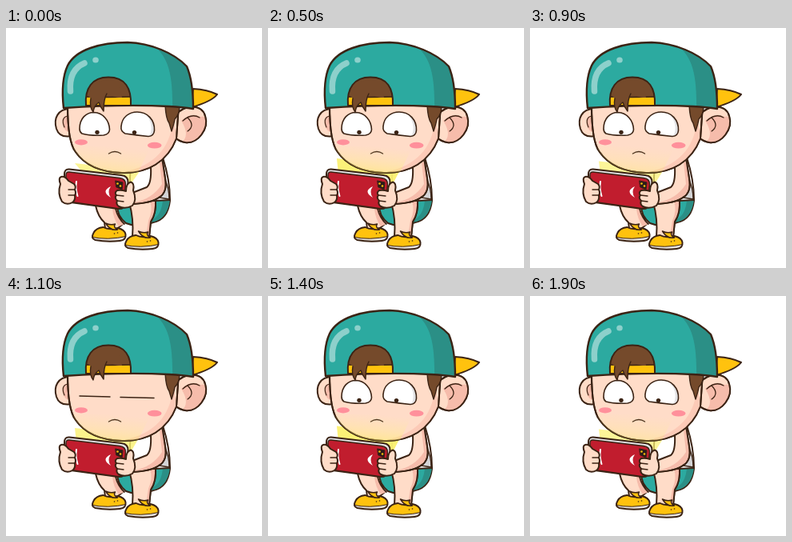
Animation of 320x300 px, one loop 2000 ms. Source, as an HTML page with a canvas:

```html
<!DOCTYPE html>
<html lang="en">
<head>
<meta charset="utf-8">
<title>Boy with a phone</title>
<style>
  html, body { margin: 0; width: 100%; height: 100%; overflow: hidden; background: #fff; }
  canvas { display: block; }
</style>
</head>
<body>
<canvas id="stage" width="320" height="300"></canvas>
<script>
const ctx = document.getElementById('stage').getContext('2d');
const LOOP = 2000, STEP = 100;
const INK = '#3b2314', SKIN = '#ffdcc8', SHADE = '#f6bcab', PINK = '#ff909b';
const TEAL = '#2caaa0', DEEP = '#2b8f86', GOLD = '#ffc20e';
const HAIR = '#754a2b', RED = '#c11d2e';

ctx.lineCap = ctx.lineJoin = 'round';

function shape(d, fill, width = 2, stroke = INK) {
  const path = new Path2D(d);
  if (fill) { ctx.fillStyle = fill; ctx.fill(path); }
  if (width) { ctx.strokeStyle = stroke; ctx.lineWidth = width; ctx.stroke(path); }
}

function oval(x, y, rx, ry, fill) {
  ctx.beginPath();
  ctx.ellipse(x, y, rx, ry, 0, 0, Math.PI * 2);
  ctx.fillStyle = fill;
  ctx.fill();
}

function clipped(d, draw) {
  ctx.save();
  ctx.clip(new Path2D(d));
  draw();
  ctx.restore();
}

function shoe(x, y) {
  const outline = 'M1 8 Q-3 15 3 17 Q18 20 34 18 Q42 17 41 10 Q40 4 31 2 Q20 5 13 1 Q4 2 1 8 Z';
  ctx.save();
  ctx.translate(x, y);
  shape(outline, GOLD, 0);
  clipped(outline, () => shape('M-3 13 Q18 18 44 12 L44 22 L-3 22 Z', '#e6e1dc', 1));
  shape(outline, null);
  shape('M16 -4 Q22 -1 28 -3 Q25 1 31 4 Q22 6 16 -4 Z', GOLD, 1.5);
  oval(27, 9, 0.8, 0.8, INK);
  oval(31, 8, 0.8, 0.8, INK);
  ctx.restore();
}

function legs() {
  shape('M136 220 Q140 236 150 244 Q164 250 184 243 Q202 240 205 216 L192 202 Z', TEAL);
  shape('M205 214 Q203 236 186 242 Q181 243 177 243 Q196 236 196 212 Z', DEEP, 0);
  shape('M112 222 Q115 236 123 243 L124 251 Q131 255 139 251 L146 245 Q141 236 138 220 Z', SKIN);
  shape('M137 226 Q140 238 148 245 L141 248 Q134 238 133 226 Z', SHADE, 0);
  shape('M137 226 Q140 238 148 245', null, 1.8);
  shape('M154 218 Q160 239 158 261 Q168 265 179 261 L181 242 Q188 232 187 214 L162 214 Z', SKIN);
  shape('M180 217 Q184 227 178 241 L175 260 L179 260 L181 242 Q188 232 187 214 Z', SHADE, 0);
  shape('M179 261 L181 242 Q188 232 187 214', null);
  shoe(108.5, 248);
  shoe(149.5, 258);
}

function torso() {
  shape('M157 170 Q152 198 158 217 L186 216 L205 215 Q205 190 196 162 Z', '#fff');
  shape('M189 207 Q198 202 198 188 Q204 200 204 214 L192 212 Z', '#d4d4d6', 1.4);
}

function arm() {
  shape('M181 174 Q182 194 176 199 L158 206 L158 220 Q181 219 191 212 Q202 206 199 188 L195 162 Z', SKIN);
  shape('M160 218 Q183 214 195 195 L192 168 L196 168 L198 188 Q201 206 190 211 Q181 217 160 219 Z', SHADE, 0);
  shape('M158 220 Q181 219 191 212 Q202 206 199 188 L195 162', null);
}

function head() {
  const ear = 'M213 108 C222 96 245 94 249 110 C254 126 240 145 224 143 Q217 142 211 137 Z';
  shape('M234 76 Q252 77 264 83 Q257 92 232 99 Z', GOLD);

  shape('M80 101 C65 101 59 113 63 126 Q67 138 82 135 Z', SKIN);
  shape('M78 110 C68 107 68 128 79 130 Z', SHADE, 0);
  shape('M77 110 Q68 112 73 124', null, 1.2);

  shape(ear, SKIN);
  clipped(ear, () => shape('M219 116 Q232 104 243 111 L252 110 L250 146 L214 146 Q233 138 219 116 Z', SHADE, 0));
  shape(ear, null);
  shape('M221 116 Q232 106 242 112 M227 112 Q237 122 227 129', null, 1.3);

  const face = 'M77 96 C77 122 79 145 87 155 C98 171 118 180 145 181 C177 182 202 167 213 138 L216 96 Z';
  shape(face, SKIN);
  clipped(face, () => shape('M209 112 C207 145 190 169 155 178 L152 185 L220 180 Z', '#fccab7', 0));
  shape(face, null);
  shape('M199 97 Q200 114 204 119 L207 129 Q210 120 211 114 Q217 108 217 97 Z', HAIR, 1.4);
  oval(94, 142.8, 8, 3.6, PINK);
  oval(185.7, 146.7, 8.8, 3.9, PINK);
  shape('M128.5 157 Q136 152 143.5 157', null, 1.4);
}

function cap() {
  const dome = 'M72 100 C70 82 70 62 77 47 C87 27 118 18 152 18 C181 19 210 31 226 48 C232 62 234 82 234 101 Q221 99 204 98 Q147 95 72 100 Z';
  shape(dome, TEAL, 0);
  clipped(dome, () => shape('M180 18 C202 34 209 54 208 104 L240 104 L238 12 Z', DEEP, 0));
  shape(dome, null, 2.4);
  shape('M80.5 79 C79 60 86 49 98 44', null, 7.5, '#8dd0cb');
  oval(112, 40, 3.8, 3.6, '#8dd0cb');

  const gap = 'M100 97 C98 75 108 61.5 128 61.5 C149 61.5 157 75 156 97 Z';
  shape(gap, HAIR, 0);
  clipped(gap, () => shape('M98 86 Q127 87 159 86 L159 98 L98 98 Z', GOLD, 1.6));
  shape(gap, null);
  shape('M103 85 Q107 66 126 65 Q143 67 145 87 Q135 87 126 82 Q122 89 122 104 Q118 99 116 93 Q110 97 109 105 Q104 99 106 88 Z', HAIR, 0);
  shape('M126 82 Q122 89 122 104 Q118 99 116 93 Q110 97 109 105 Q104 99 106 88', null, 1.4);
}

function eyes(shut) {
  if (shut) {
    shape('M92 125 L130 126 M143 126.5 L185 127.5', null, 1.5);
    return;
  }
  const left = 'M92 126 C92 113 100 105.5 110 105.5 C121 106 129 115 129.5 127 Q129 133 122 134 Q106 135 95 132 Q92 130 92 126 Z';
  const right = 'M144 123 C145 111 154 105 164 105 C177 105 186 115 185.5 128 Q185 135 178 135.5 Q163 134 149 132 Q143 129 144 123 Z';
  for (const eye of [left, right]) shape(eye, '#fff', 0);
  clipped(right, () => shape('M171 104 Q187 118 179 137 L190 136 L190 104 Z', '#e2e2e4', 0));
  for (const eye of [left, right]) shape(eye, null, 1.6);
  oval(114, 130.3, 2.7, 2.6, INK);
  oval(160.5, 130.5, 2.7, 2.6, INK);
}

// Two pulses per loop, strongest at 400 and 1400 ms.
function pulse(time) {
  return Math.cos((time - 400) / LOOP * Math.PI * 4);
}

function beam(time) {
  const open = Math.min(1, time / STEP);
  const top = 164.5 - 2 * pulse(time) + 3 * (1 - open);
  const foot = 98 - 10 * open;
  ctx.globalAlpha = 0.85 + 0.12 * pulse(time);
  shape(`M86 ${top} L168 ${top + 9} L156 195 L${foot} 183 Z`, '#fbf172', 0);
  ctx.globalAlpha = 1;
}

function faceGlow(time) {
  const power = 0.48 + 0.1 * pulse(time);
  const fade = ctx.createLinearGradient(130, 147, 126, 184);
  fade.addColorStop(0, 'rgba(255,240,150,0)');
  fade.addColorStop(0.5, `rgba(255,240,130,${power * 0.5})`);
  fade.addColorStop(1, `rgba(255,238,90,${power})`);
  clipped('M77 96 C77 122 79 145 87 155 C98 171 118 180 145 181 C177 182 202 167 213 138 L216 96 Z', () =>
    shape('M84 147 L180 150 L160 190 L90 182 Z', fade, 0));
}

function phone() {
  shape('M79 176.5 L144 184 Q153 185 152.5 193 L149 219 Q148 227 140 226 L81 218 Q74 217 74 210 L73 183 Q73 176 79 176.5 Z', '#e4e4e8', 2);
  shape('M79 180 L142 187.5 Q150 188.5 149.5 196 L147 218 Q146 226 139 225.5 L81 217.5 Q75 217 75 210 L75 184 Q75 179.5 79 180 Z', RED, 1.5);
  shape('M88 192 Q86.5 201 89.5 210', null, 2, '#fff');
  shape('M131 198 Q118 204 131 212 Q126 205 131 198 Z', '#fff', 0);
  shape('M137 191 L146 193 L145 202 L138 199 Z', '#2a1b1a', 1);
  oval(139.5, 194.5, 1.3, 1.3, GOLD);
  oval(143, 197.5, 1.3, 1.3, GOLD);
}

function hands() {
  shape('M68 195 Q65 187 69 186 Q74 185 78 191 L85 195 Q88 198 86 202 Q88 206 86 209 Q87 215 83 218 Q76 222 70 217 Q64 207 68 195 Z', SKIN);
  shape('M78 202 L86 202 M78 209 L86 209', null, 1.3);

  shape('M139 203 Q144 202 150 204 Q150 194 156 192.5 Q161 194 159 203 Q164 215 158 222 Q149 227 141 223 Q137 220 139 216 Q135 212 138 209 Q135 206 139 203 Z', SKIN);
  shape('M138 209 L147 210 M139 216 L147 217', null, 1.3);
}

function render(now) {
  const time = Math.floor((now % LOOP) / STEP) * STEP;
  ctx.fillStyle = '#fff';
  ctx.fillRect(0, 0, 320, 300);
  legs();
  torso();
  arm();
  beam(time);
  head();
  cap();
  eyes(time >= 1000 && time < 1200);
  faceGlow(time);
  phone();
  hands();
}

const start = performance.now();
function tick() {
  render(performance.now() - start);
  requestAnimationFrame(tick);
}
tick();
</script>
</body>
</html>
```
